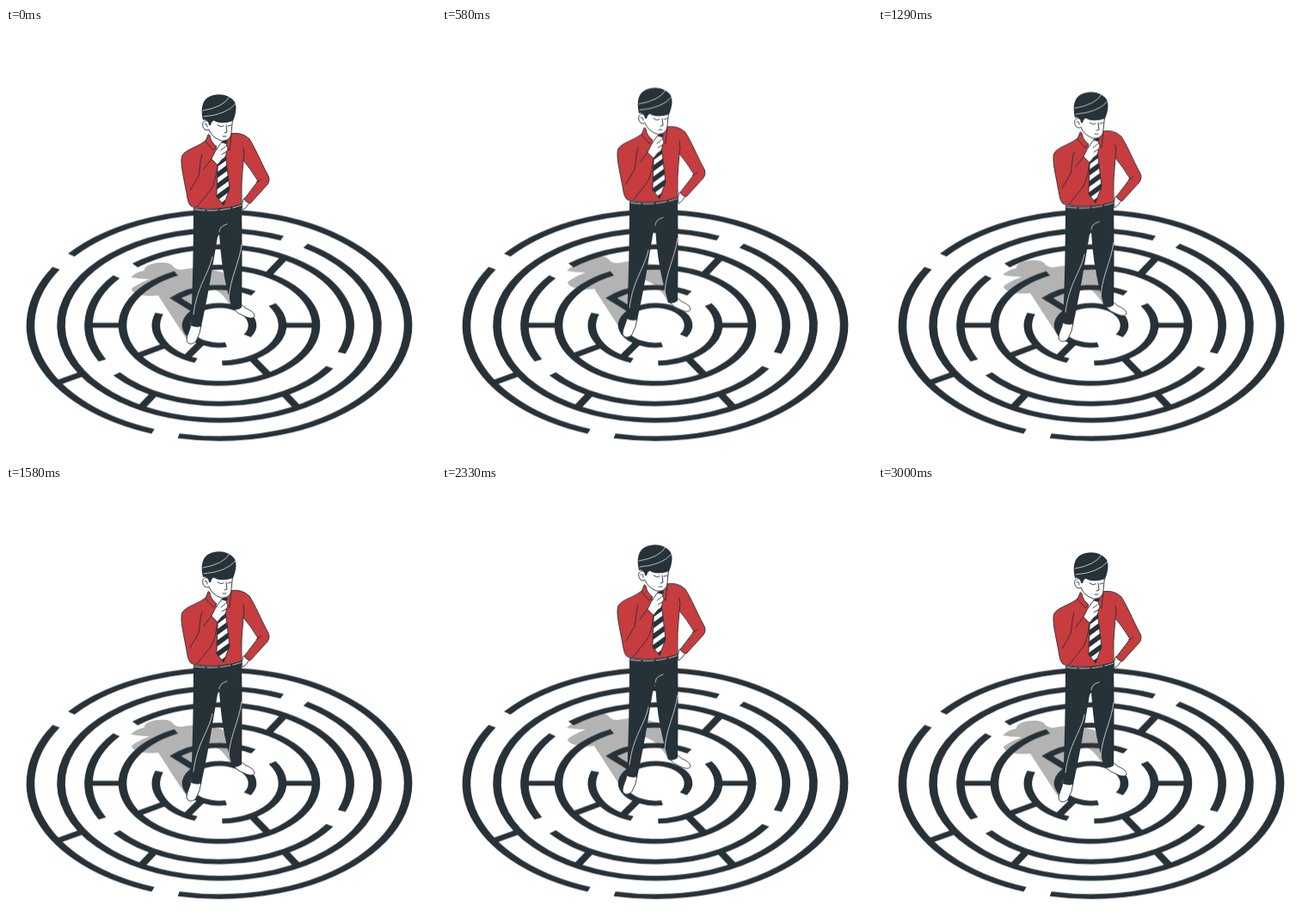
These frames come from a looping animation (500x500 px, 3040 ms). An HTML page:

```html
<!DOCTYPE html>
<html lang="en">
<head>
<meta charset="utf-8">
<title>Man in a maze</title>
<style>
  html, body { margin: 0; width: 100%; height: 100%; overflow: hidden; background: #fff; }
  svg { display: block; width: 100vw; height: 100vh; }
  .float { animation: float 3040ms linear infinite; }
  /* two 1500 ms bobs, then a short rest */
  @keyframes float {
    0%, 49.342%, 98.684%, 100% { transform: translateY(0); }
    24.671%, 74.013% { transform: translateY(-10px); }
  }
  .ink { fill: #263238; }
  .red { fill: #c73c3f; }
  .white { fill: #fff; }
  .line { fill: none; }
  .line, .edge { stroke: #263238; stroke-width: .9; stroke-linecap: round; stroke-linejoin: round; }
  .shine { fill: none; stroke: #fff; stroke-width: .7; stroke-linecap: round; }
  .belt { stroke-dasharray: 12 3; }
  #maze { fill: none; stroke: #263238; stroke-width: 9.6; }
</style>
</head>
<body>
<svg viewBox="0 0 500 500">
  <defs>
    <pattern id="stripes" y="346" width="40" height="13" patternUnits="userSpaceOnUse" patternTransform="skewY(-36)">
      <rect class="white" width="40" height="13"/>
      <rect class="ink" width="40" height="7"/>
    </pattern>
  </defs>

  <g class="float">
    <path fill="#b3b3b3" d="M145 290 Q152 283 161 282 C159 273 190 269 194 277 Q197 281 204 281 L224 278 L252 284 L270 326 L263 327 Q251 302 228 299 L219 352 L210 362 L177 311 C164 313 146 310 146 303 Q154 297 167 292 Q155 292 145 290 Z"/>
  </g>

  <g id="maze" transform="translate(248 345.7) scale(1 .6)"></g>

  <g class="float">
    <!-- feet -->
    <path class="white edge" d="M215 345 C214 352 210 357 210 363 C211 369 218 368 221 364 Q226 355 227 346 Z"/>
    <path class="white edge" d="M264 326 Q270 333 277 335 C283 338 288 338 289 335 C289 331 284 328 279 326 L273 321 Z"/>

    <!-- trousers -->
    <path class="ink" d="M218 209 Q218 280 215 346 Q221 349 227 347 Q236 305 240 278 L246 243 L248 240 Q250 275 257 304 L263 327 Q269 329 274 325 Q275 270 274 204 Q248 214 218 209 Z"/>
    <path class="shine" d="M248 237 C249 231 252 230 257 228 M240 266 C236 286 222 300 218 333 M274 252 C271 274 261 290 259 314"/>
    <path class="shine belt" d="M219 211 Q248 215 274 206"/>

    <!-- hand on hip -->
    <path class="white edge" d="M276 199 Q273 205 275 212 Q280 209 283 203 L281 198 Z"/>

    <!-- shirt -->
    <path class="red edge" d="M260 123 Q274 120 283 129 C290 140 296 155 304 170 Q308 176 304 182 L284 204 Q279 203 277 199 L293 178 Q284 163 276 154 Q273 180 274 205 Q245 214 217 208 C211 206 211 196 209 187 C206 171 202 155 205 148 C210 140 226 138 234 129 Z"/>
    <path class="line" d="M276 154 Q278 146 276 139 M297 176 L291 179"/>

    <!-- neck, front and tie -->
    <path class="white" d="M237 121 V130 L246 141 L254 136 L256 130 Z"/>
    <path class="red edge" d="M235 124 L232 132 L241 142 L245 138 Q238 133 237 125 Z"/>
    <path class="red edge" d="M258 127 L254 138 L260 142 L262 123 Z"/>
    <path class="edge" fill="url(#stripes)" d="M247 145 H255 L260 187 L253 206 L245 196 Z"/>

    <!-- raised arm -->
    <path class="red" d="M239 152 Q223 171 212 192 Q212 205 218 208 Q234 202 240 181 L247 158 Z"/>
    <path class="line" d="M228 147 C225 155 226 163 224 172 L214 189 M239 152 L230 164 M246 157 Q244 180 238 188 L222 208"/>
    <path class="white edge" d="M239 152 Q243 143 249 135 C253 130 259 132 256 137 Q260 140 256 144 Q257 150 251 153 L246 159 Z"/>
    <path class="line" d="M255 138 L250 142 M256 144 L251 147"/>

    <!-- head -->
    <path class="white edge" d="M234 108 C228 106 227 114 231 118 Q234 120 236 118 Q239 127 250 131 C258 132 262 127 262 121 L264 102 H240 Z"/>
    <path class="line" d="M231 112 Q234 110 234 115 M246 113 Q250 116 253 114 M258 114 L262 113 M256 113 L257 121 L254 122 M252 126 H256"/>
    <path class="ink" d="M229 107 C226 95 228 84 236 80 C246 75 260 77 266 86 C269 92 267 101 264 108 Q253 112 244 109 C241 106 239 109 238 113 H236 C236 109 232 105 229 107 Z"/>
    <path class="shine" d="M229 96 Q253 92 260 80 M230 103 Q256 101 267 88"/>
    <path class="ink" d="M250 133 Q254 129 258 132 L256 135 Z"/>
  </g>
</svg>
<script>
  const maze = document.getElementById('maze');
  const GAP = 31;

  // each ring: radius, angles where it opens, angles of spokes to the next ring in
  const rings = [
    { r: 219.5, gaps: [106.5, 214.3], spokes: [149.4] },
    { r: 184, gaps: [298.2], spokes: [60.3, 119.7] },
    { r: 152, gaps: [26.5, 147.6, 224], spokes: [180, 300] },
    { r: 112.5, gaps: [251.4], spokes: [0, 59.3, 148.2] },
    { r: 73.5, gaps: [99.5, 210.3, 314.8], spokes: [121.5, 226] },
    { r: 38.5, gaps: [55], spokes: [] }
  ];

  const at = (r, deg) => {
    const a = deg * Math.PI / 180;
    return `${r * Math.cos(a)} ${r * Math.sin(a)}`;
  };
  const draw = d => {
    const path = document.createElementNS('http://www.w3.org/2000/svg', 'path');
    path.setAttribute('d', d);
    maze.append(path);
  };
  const wall = (r, from, to) => {
    const arc = end => `A${r} ${r} 0 0 1 ${at(r, end)}`;
    draw(`M${at(r, from)}${arc((from + to) / 2)}${arc(to)}`);
  };

  rings.forEach(({ r, gaps, spokes }, i) => {
    const half = GAP / r * 90 / Math.PI;
    gaps.forEach((gap, k) => wall(r, gap + half, (gaps[k + 1] ?? gaps[0] + 360) - half));
    for (const deg of spokes) draw(`M${at(rings[i + 1].r, deg)}L${at(r, deg)}`);
  });
</script>
</body>
</html>
```
